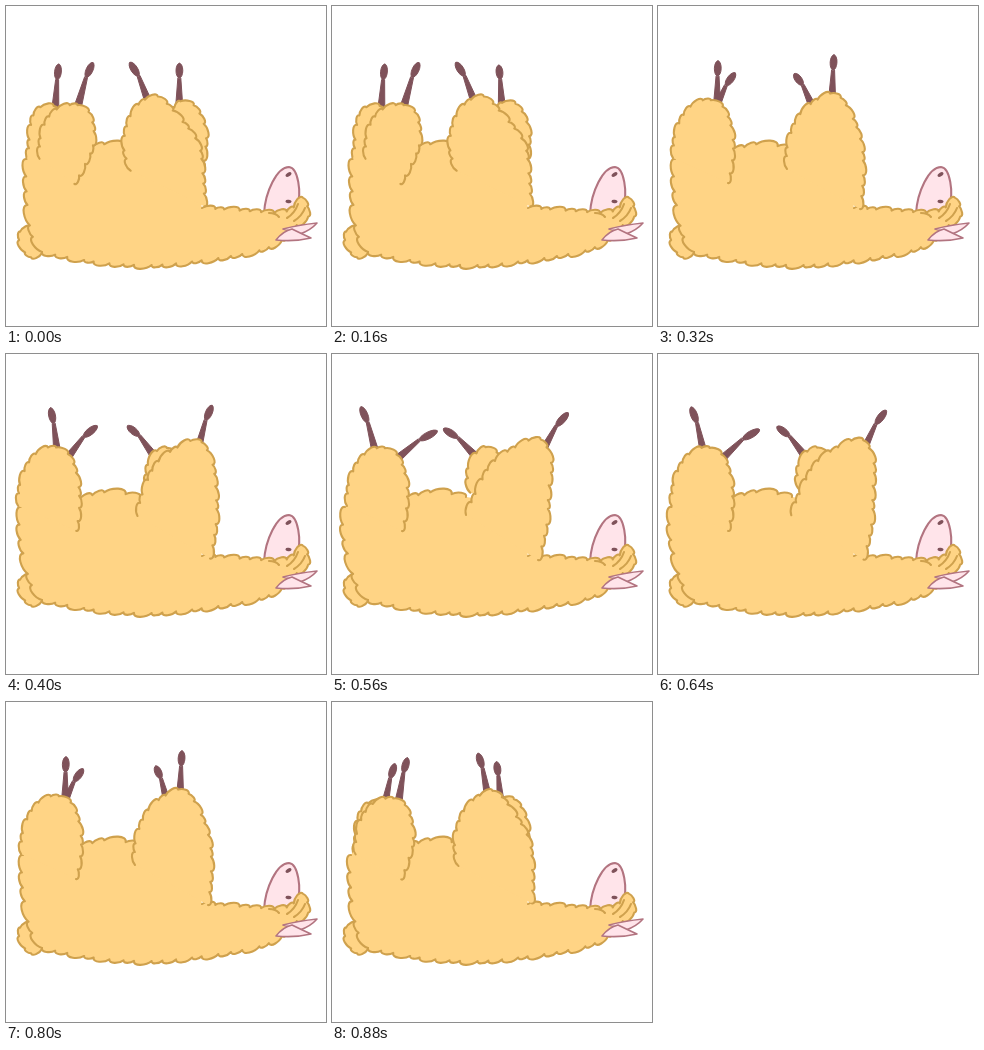
These frames come from a looping animation (320x320 px, 0.96 s). An HTML page with a canvas:

```html
<!DOCTYPE html>
<html>
<head>
<meta charset="utf-8">
<style>
  html, body { margin: 0; width: 100%; height: 100%; overflow: hidden; background: #fff; }
  canvas { display: block; width: 320px; height: 320px; }
</style>
</head>
<body>
<canvas id="stage" width="320" height="320"></canvas>
<script>
const ctx = document.getElementById('stage').getContext('2d');
const STEP = 80, STEPS = 12;
const WOOL = '#ffd485', EDGE = '#cfa14d', PINK = '#ffe4ea', ROSE = '#b27480', SHIN = '#7f525a';

// Key points are [x, y, swingX, swingY]: a rest place and how far the swing carries it.
const NECK = [[196, 202], [225, 204], [268, 207]];
const CROWN = [[268, 207], [285, 204], [295, 191], [301, 200], [302, 211], [285, 223], [276, 234]];
const BOTTOM = [[276, 234], [258, 243], [225, 250], [190, 255], [148, 259], [100, 257], [62, 251], [36, 246]];
const FLANK = [[36, 246], [25, 228, 1], [19, 200, 3], [16, 175, 5], [17, 153, 4]];
const BELLY = [[70, 150], [84, 142], [104, 138], [134, 143]];
const TAIL = [[36, 247], [24, 251], [15, 239], [13, 227], [24, 221]];

// toe and base give a leg's place as a function of the swing c, from -1 to 1.
const LEGS = {
  farHind: {
    lag: 1, tufts: 9, ease: c => c,
    toe: c => [77 - 28 * c, 67 - 10 * c],
    base: c => [57 - 9 * c, 104],
    wool: [[24, 155, -2], [26, 125, -2], [33, 107, -5], [46, 98, -5], [58, 106, -6], [64, 130, -6]]
  },
  farFront: {
    lag: 0.6, tufts: 9, ease: c => c,
    toe: c => [143 + 32 * c, 66 - 9 * c],
    base: c => [158 + 16 * c, 101],
    wool: [[151, 126, 13, -13], [153, 107, 17, -7], [165, 94, 15], [178, 101, 14, 3],
      [185, 118, 15, 6], [187, 136, 13, 5], [188, 158, 8, 8]]
  },
  nearHind: {
    lag: 1, tufts: 15, ease: c => (c + c * c) / 2,
    toe: c => [60 + 31 * c, 55 + 2 * c],
    base: c => [59 + 15 * c, 100],
    wool: [[15, 152, 23, 1], [18, 126, 22], [30, 103, 22, 3], [47, 94, 25, 6], [64, 100, 22, 6],
      [73, 122, 18, 3], [75, 145, 14, -4], [73, 160, 4, 4], [70, 177, -2, 1]]
  },
  nearFront: {
    lag: 1, tufts: 19, ease: c => c,
    toe: c => [176 - 60 * c, 49 + 10 * c * c],
    base: c => [174 - 36 * c, 94 + 4 * c * c],
    wool: [[129, 163, -5, 2], [130, 139, -14], [141, 110, -19], [159, 94, -25, 1], [178, 88, -30, 3],
      [193, 109, -26], [203, 137, -13], [205, 167, -10], [202, 203, -4, -3]]
  }
};

const mix = (a, b, k) => a + (b - a) * k;
const swingAt = (step, lag) => Math.cos((step - lag) / STEPS * Math.PI * 2);
const carry = (keys, k) => keys.map(([x, y, dx = 0, dy = 0]) => [x + dx * k, y + dy * k]);

// Fine points of a smooth curve through the keys.
function curve(keys) {
  const at = i => keys[Math.max(0, Math.min(keys.length - 1, i))];
  const pts = [keys[0]];
  for (let i = 0; i < keys.length - 1; i++) {
    for (let u = 0.1; u < 1.05; u += 0.1) {
      pts.push([0, 1].map(n => {
        const [a, b, c, d] = [at(i - 1)[n], at(i)[n], at(i + 1)[n], at(i + 2)[n]];
        return b + u / 2 * (c - a + u * (2 * a - 5 * b + 4 * c - d + u * (3 * (b - c) + d - a)));
      }));
    }
  }
  return pts;
}

// Cuts the curve into tufts of slightly uneven length.
function tuftEnds(keys, count) {
  const pts = curve(keys), run = [0];
  for (let i = 1; i < pts.length; i++) {
    run.push(run[i - 1] + Math.hypot(pts[i][0] - pts[i - 1][0], pts[i][1] - pts[i - 1][1]));
  }
  return Array.from({ length: count + 1 }, (_, n) => {
    const uneven = n % count ? 0.16 * Math.sin(n * 2.4) : 0;
    const goal = run[run.length - 1] * (n + uneven) / count;
    const i = Math.max(1, run.findIndex(r => r >= goal - 1e-6));
    const k = (goal - run[i - 1]) / (run[i] - run[i - 1]);
    return [mix(pts[i - 1][0], pts[i][0], k), mix(pts[i - 1][1], pts[i][1], k)];
  });
}

// Clockwise run of tufts, each leaning forward over its end.
function fleece(path, keys, count, joined) {
  const ends = tuftEnds(keys, count);
  joined ? path.lineTo(...ends[0]) : path.moveTo(...ends[0]);
  for (let i = 1; i < ends.length; i++) {
    const [x, y] = ends[i - 1], [ex, ey] = ends[i], dx = ex - x, dy = ey - y;
    path.bezierCurveTo(x + dx * 0.3 + dy * 0.26, y + dy * 0.3 - dx * 0.26,
      x + dx * 1.05 + dy * 0.34, y + dy * 1.05 - dx * 0.34, ex, ey);
  }
}

function paint(path, fill, edge, width = 2.1) {
  if (fill) { ctx.fillStyle = fill; ctx.fill(path); }
  if (edge) { ctx.strokeStyle = edge; ctx.lineWidth = width; ctx.stroke(path); }
}

function drawFleece(keys, count, fill = WOOL) {
  const path = new Path2D();
  fleece(path, keys, count);
  paint(path, fill, EDGE);
}

function oval(x, y, rx, ry, tilt) {
  const path = new Path2D();
  path.ellipse(x, y, rx, ry, tilt, 0, Math.PI * 2);
  return path;
}

function drawShin([tx, ty], [bx, by]) {
  const ax = mix(tx, bx, 0.46), ay = mix(ty, by, 0.34);
  const len = Math.hypot(bx - ax, by - ay), nx = (by - ay) / len, ny = (ax - bx) / len;
  const bone = new Path2D();
  bone.moveTo(ax + nx * 1.5, ay + ny * 1.5);
  bone.lineTo(bx + nx * 3.6, by + ny * 3.6);
  bone.lineTo(bx - nx * 3.6, by - ny * 3.6);
  bone.lineTo(ax - nx * 1.5, ay - ny * 1.5);
  bone.closePath();
  paint(bone, SHIN, SHIN, 1);
  const reach = Math.hypot(tx - ax, ty - ay) * 0.5;
  paint(oval(mix(tx, ax, 0.48), mix(ty, ay, 0.48), reach, 3.4, Math.atan2(ty - ay, tx - ax)), SHIN, SHIN, 1);
}

function drawLeg({ lag, tufts, ease, toe, base, wool }, step) {
  const c = swingAt(step, lag);
  drawShin(toe(c), base(c));
  drawFleece(carry(wool, ease(c)), tufts);
}

function drawSnout() {
  paint(new Path2D('M258 208C259 186 271 161 283 161C292 162 296 186 291 202'), PINK, ROSE);
  paint(oval(282.5, 168.5, 3.3, 1.8, -0.6), SHIN);
  paint(oval(282.5, 195.5, 3, 1.7, 0.1), SHIN);
}

function drawBody(step) {
  const runs = [[NECK, 6], [CROWN, 8], [BOTTOM, 18], [carry(FLANK, swingAt(step, 1)), 6]];
  const fill = new Path2D();
  drawFleece(TAIL, 5);
  runs.forEach(([keys, count], i) => fleece(fill, keys, count, i > 0));
  fill.lineTo(40, 120);
  fleece(fill, BELLY, 4, true);
  fill.lineTo(185, 150);
  paint(fill, WOOL);
  for (const [keys, count] of [...runs, [BELLY, 4]]) drawFleece(keys, count, null);
}

function drawEars() {
  paint(new Path2D('M277 223Q292 219 311 217Q305 224 294 228Z'), PINK, ROSE, 1.6);
  paint(new Path2D('M270 234Q277 225 286 223Q294 227 305 232Q288 236 270 234Z'), PINK, ROSE, 1.6);
  paint(new Path2D('M292 198Q289 207 281 212M299 202Q296 210 288 215M263 207Q270 207 273 211'), null, EDGE);
}

function draw(step) {
  ctx.fillStyle = '#fff';
  ctx.fillRect(0, 0, 320, 320);
  ctx.lineCap = ctx.lineJoin = 'round';
  drawLeg(LEGS.farHind, step);
  drawLeg(LEGS.farFront, step);
  drawSnout();
  drawBody(step);
  drawLeg(LEGS.nearHind, step);
  drawLeg(LEGS.nearFront, step);
  drawEars();
}

const start = performance.now();
function tick() {
  draw(Math.floor((performance.now() - start) / STEP) % STEPS);
  requestAnimationFrame(tick);
}
tick();
</script>
</body>
</html>
```
